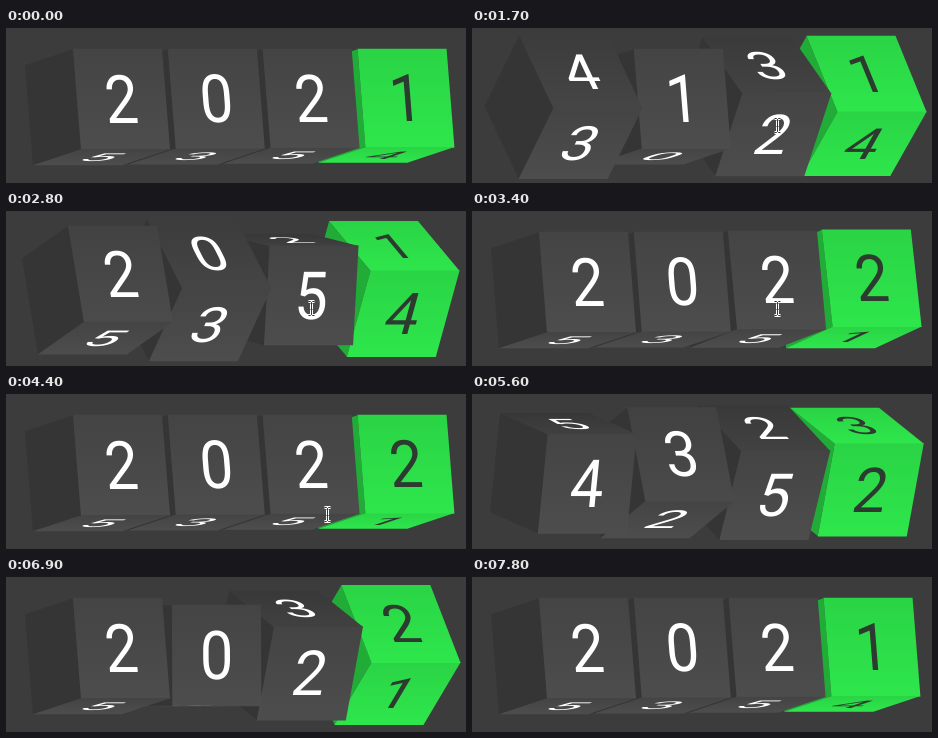
These frames come from a looping animation (460 px wide and 155 px high, 8.3 s). An HTML page with a canvas:

```html
<!DOCTYPE html>
<html lang="en">
<head>
<meta charset="utf-8">
<title>Rolling number cubes</title>
<style>
  html, body { margin: 0; width: 100%; height: 100%; overflow: hidden; background: #3c3c3c; }
  canvas { display: block; }
</style>
</head>
<body>
<canvas id="stage" width="460" height="155"></canvas>
<script>
const ctx = document.getElementById('stage').getContext('2d');
const LOOP = 8300, STEP = 100, FORTH = 650, REST = 4400, BACK = 4490;
const PITCH = 95, WIDTH = 89;
// Oblique view: projected half edges of a cube, downwards and towards the viewer
const DOWN = [4, 50], NEAR = [24, -8];

// low: smallest digit on the cube, home: digit in front, turns: quarter turns per spin
const cubes = [
  { low: 2, home: 2, turns: 4, delay: 0, spin: 2400 },
  { low: 0, home: 0, turns: 4, delay: 250, spin: 2400 },
  { low: 2, home: 2, turns: 4, delay: 525, spin: 2320 },
  { low: 1, home: 1, turns: 5, delay: 990, spin: 1865, windUp: 0.39, green: true },
];

const clamp = (v, lo, hi) => Math.min(hi, Math.max(lo, v));
const mix = (a, b, ka, kb) => [a[0] * ka + b[0] * kb, a[1] * ka + b[1] * kb];
const gray = v => `rgb(${v},${v},${v})`;

function turned(cube, time) {
  const x = (time - cube.delay) / cube.spin;
  const ease = (1 - Math.cos(Math.PI * clamp(x, 0, 1))) / 2;
  const dip = Math.cos(Math.PI * clamp((x - 0.08) / 0.52, -0.5, 0.5)) ** 2;
  return cube.turns * ease - (cube.windUp || 0) * dip;
}

function position(cube, t) {
  return t < REST
    ? cube.home + turned(cube, t - FORTH)
    : cube.home + cube.turns - turned(cube, t - BACK);
}

function faceFill(cube, angle) {
  const fill = ctx.createLinearGradient(0, -50, 0, 50);
  const light = 72 - 14 * Math.max(0, Math.sin(angle));
  fill.addColorStop(0, cube.green ? 'rgb(42,212,69)' : gray(light - 4));
  fill.addColorStop(1, cube.green ? 'rgb(46,230,76)' : gray(light + 5));
  return fill;
}

function drawCube(cube, i, t) {
  const cx = 47 + PITCH * i, cy = 79.2 - 0.4 * i;
  const size = 1 - 0.007 * i; // farther cubes look slightly smaller
  const pos = position(cube, t);
  for (let k = 0; k < 4; k++) {
    const digit = cube.low + k;
    const angle = (digit - pos) * Math.PI / 2;
    const cos = size * Math.cos(angle), sin = size * Math.sin(angle);
    const out = mix(NEAR, DOWN, cos, -sin);
    const down = mix(DOWN, NEAR, cos, sin);
    if (k === 0) {
      ctx.setTransform(out[0] / 50, out[1] / 50, down[0] / 50, down[1] / 50, cx, cy);
      ctx.fillStyle = cube.green ? 'rgb(33,172,56)' : gray(53);
      ctx.fillRect(-50, -50, 100, 100);
    }
    if (down[1] <= 0) continue;
    ctx.setTransform(WIDTH / 100, 0, down[0] / 50, down[1] / 50, cx + out[0], cy + out[1]);
    ctx.fillStyle = faceFill(cube, angle);
    ctx.fillRect(0, -50.4, 100, 100.8);
    ctx.fillStyle = cube.green ? '#2d3a2f' : '#fff';
    ctx.fillText(digit, 50, 23.5);
  }
}

function drawPointer(t) {
  if (t < 1200 || t >= 4600) return;
  const enter = clamp((t - 1200) / 400, 0, 1), leave = clamp((t - 4000) / 400, 0, 1.3);
  const x = Math.round(325 - 20 * enter + 16 * leave);
  const y = Math.round(150 - 53 * enter + 23 * leave);
  ctx.setTransform(1, 0, 0, 1, x + 0.5, y + 0.5);
  const beam = new Path2D('M-3-7H-1L0-6L1-7H3M0-6V6M-3 7H-1L0 6L1 7H3M-1 1H1');
  ctx.lineWidth = 3;
  ctx.strokeStyle = '#fff';
  ctx.stroke(beam);
  ctx.lineWidth = 1;
  ctx.strokeStyle = '#333';
  ctx.stroke(beam);
}

function draw() {
  const t = Math.floor(performance.now() % LOOP / STEP) * STEP;
  ctx.setTransform(1, 0, 0, 1, 0, 0);
  ctx.fillStyle = '#3c3c3c';
  ctx.fillRect(0, 0, 460, 155);
  ctx.font = '67px Roboto, sans-serif';
  ctx.textAlign = 'center';
  // The row recedes to the right, so paint from there
  for (let i = cubes.length - 1; i >= 0; i--) drawCube(cubes[i], i, t);
  drawPointer(t);
  requestAnimationFrame(draw);
}
draw();
</script>
</body>
</html>
```
